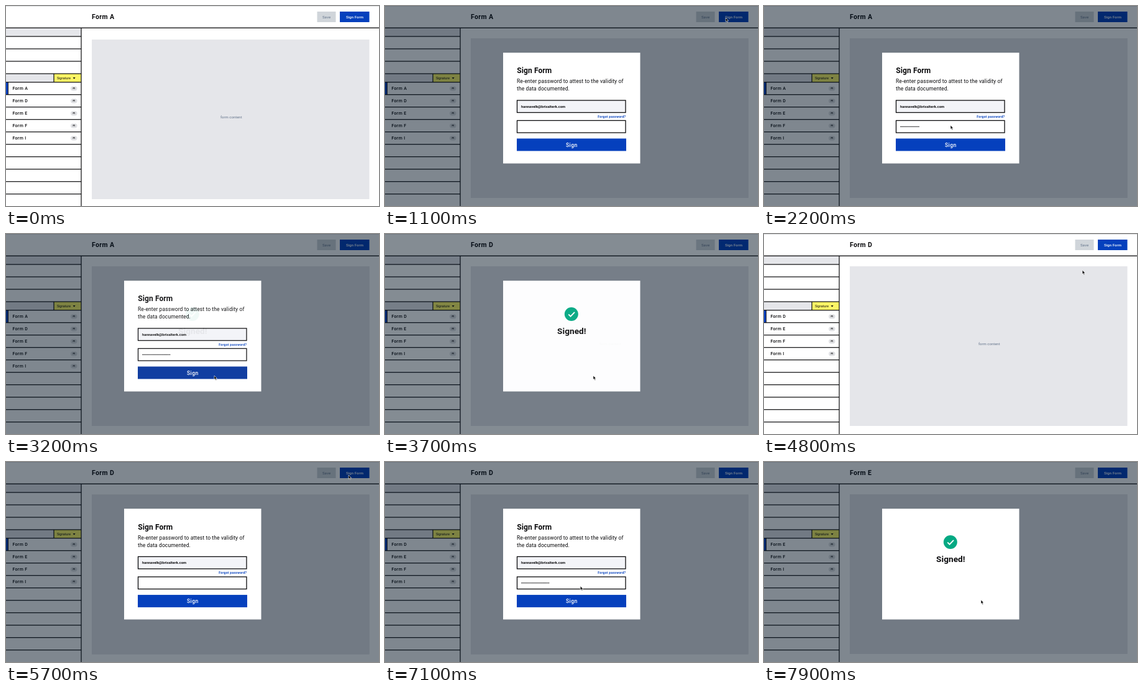
Animation of 600 by 322 pixels, one loop 8 s. Source, as an HTML page with a canvas:

```html
<!DOCTYPE html>
<html lang="en">
<head>
<meta charset="utf-8">
<title>Sign Form</title>
<style>
html, body { margin: 0; width: 100%; height: 100%; overflow: hidden; background: #fff; }
canvas { display: block; width: 600px; height: 322px; }
</style>
</head>
<body>
<canvas id="stage"></canvas>
<script>
const W = 600, H = 322, LOOP = 8000, CYCLE = 4600;
const INK = '#0b0b0d', BLUE = '#0540bd', GRAY = '#e5e6ea';
const FORMS = 'ADEFI';
const EMAIL = 'hannavelk@brisalterk.com';
const DOTS = 22;
const scale = Math.max(1, window.devicePixelRatio || 1);

function prepare(canvas) {
  canvas.width = W * scale;
  canvas.height = H * scale;
  const c = canvas.getContext('2d');
  c.scale(scale, scale);
  c.textBaseline = 'alphabetic';
  return c;
}
const view = prepare(document.getElementById('stage'));
const layer = document.createElement('canvas');
const back = prepare(layer);
let g = view;

const clamp = v => Math.max(0, Math.min(1, v));
const ease = v => v < .5 ? 4 * v ** 3 : 1 - 4 * (1 - v) ** 3;

function rect(x, y, w, h, color) {
  g.fillStyle = color;
  g.fillRect(x, y, w, h);
}

// y is the middle of the capital letters
function text(s, x, y, size, weight, color, spacing = 0, align = 'left') {
  g.font = `${weight} ${size}px Roboto, sans-serif`;
  g.letterSpacing = spacing + 'px';
  g.textAlign = align;
  g.fillStyle = color;
  g.fillText(s, x, y + size * .356);
}

function poly(points, color) {
  g.beginPath();
  points.forEach(([x, y]) => g.lineTo(x, y));
  g.closePath();
  g.fillStyle = color;
  g.fill();
}

function field(y, color) {
  g.fillStyle = color;
  g.strokeStyle = INK;
  g.lineWidth = 1.3;
  g.fillRect(212.5, y, 174.5, 19.6);
  g.strokeRect(212.5, y, 174.5, 19.6);
}

function sidebar(n) {
  rect(0, 36, 121, 13, GRAY);
  rect(0, 109, 77, 14, GRAY);
  rect(77, 109, 44, 14, '#fcf565');
  rect(76.4, 109, 1.2, 14, INK);
  text('Signature', 82, 116, 5, 400, INK, .08);
  poly([[107.6, 115], [111.6, 115], [109.6, 117.6]], INK);

  rect(0, 123, 3.3, 20, BLUE);
  rect(3.1, 123, .9, 20, INK);
  [...FORMS.slice(n)].forEach((name, i) => {
    const y = 132.8 + i * 20;
    text('Form ' + name, 10.4, y, 7, 500, INK, .35);
    g.beginPath();
    g.roundRect(104, y - 3.6, 10.6, 7.2, 3.6);
    g.fillStyle = '#e0e1e4';
    g.fill();
    text('PI', 109.3, y, 3.8, 700, INK, 0, 'center');
  });

  for (let y = 49; y <= 109; y += 20) rect(0, y - .6, 121, 1.2, INK);
  for (let y = 122.7; y < H; y += 20) rect(0, y - .6, 121, 1.2, INK);
  rect(120.4, 35, 1.2, H, INK);
}

function page(n, top) {
  rect(0, 0, W, H, '#fff');
  rect(0, 0, W, 1, '#dfe0e2');
  sidebar(n);
  rect(0, 34.6, W, 1.3, INK);
  text('Form ' + FORMS[n], 138, 17.5, 10.5, 700, INK, .35);
  rect(500.5, 9, 30, 17, '#d0d5da');
  text('Save', 515.6, 17.5, 6, 400, '#64748b', .15, 'center');
  rect(537, 9, 47.5, 17, BLUE);
  text('Sign Form', 561, 17.5, 6, 500, '#fff', .08, 'center');
  rect(138, top, 446.5, 257, GRAY);
  text('form content', 362.3, top + 125.2, 6, 400, '#64748b', 0, 'center');
}

function dialog(n, top) {
  page(n, top);
  // the caption is hidden while a dialog is open
  rect(138, top, 446.5, 257, GRAY);
  rect(0, 0, W, H, 'rgba(0,16,32,.5)');
  rect(190, 75.2, 220.5, 178.3, '#fff');
}

function signDialog(n, dots, hot) {
  const dy = n ? .5 : 0;
  dialog(n, 52 + dy);
  g.save();
  g.translate(0, dy);
  text('Sign Form', 212.3, 103.8, 12, 700, INK, .1);
  text('Re-enter password to attest to the validity of', 212, 121.3, 8.5, 400, INK, .11);
  text('the data documented.', 212, 133, 8.5, 400, INK, .11);
  field(151.9, '#f3f4f8');
  text(EMAIL, 219, 161.8, 5.8, 700, INK, .06);
  text('Forgot password?', 387.3, 178, 5, 700, BLUE, .3, 'right');
  field(184.4, '#fff');
  for (let i = 0; i < dots; i++) {
    g.beginPath();
    g.arc(220 + i * 2.07, 194.2, .8, 0, 7);
    g.fillStyle = INK;
    g.fill();
  }
  rect(212, 213.4, 176, 20, hot ? '#03339c' : BLUE);
  text('Sign', 300.3, 223.5, 8.6, 500, '#fff', .4, 'center');
  g.restore();
}

function signedDialog(n) {
  dialog(n, 52);
  g.beginPath();
  g.arc(299.8, 129, 11, 0, 7);
  g.fillStyle = '#04a983';
  g.fill();
  g.beginPath();
  g.moveTo(295.2, 129.4);
  g.lineTo(298.5, 132.6);
  g.lineTo(305, 125.8);
  g.strokeStyle = '#fff';
  g.lineWidth = 1.9;
  g.stroke();
  text('Signed!', 300.3, 156, 13.5, 700, INK, .1, 'center');
}

function dissolve(draw, p) {
  if (p <= 0) return;
  g = back;
  draw();
  g = view;
  g.globalAlpha = p;
  g.drawImage(layer, 0, 0, W, H);
  g.globalAlpha = 1;
}

// each move: start, end, from, to
const MOVES = [
  [100, 800, 430, 130, 548, 19],
  [1300, 1750, 548, 19, 300, 192],
  [2250, 2800, 300, 192, 335, 228],
  [4350, 5050, 335, 228, 551, 21],
  [5850, 6350, 551, 21, 302, 192],
  [6900, 7400, 302, 192, 349, 222]
];

function pointer(t) {
  const move = MOVES.filter(m => m[0] <= t).pop();
  if (!move) return;
  const [a, b, x0, y0, x1, y1] = move;
  const p = ease(clamp((t - a) / (b - a)));
  g.save();
  g.translate(x0 + (x1 - x0) * p, y0 + (y1 - y0) * p);
  const arrow = [[0, 0], [0, 6.3], [1.4, 5.1], [2.5, 7.4], [3.6, 6.9], [2.6, 4.7], [4.4, 4.5]];
  poly(arrow, '#000');
  g.strokeStyle = '#fff';
  g.lineWidth = .6;
  g.stroke();
  g.restore();
}

function render(t) {
  const n = t < CYCLE ? 0 : 1, u = t - n * CYCLE;
  const signedAt = n ? 3080 : 3190;
  const opened = clamp((u - 930) / 160);
  const signed = clamp((u - signedAt) / 200);
  const closed = clamp((u - 3690) / 290);
  const dots = Math.round(DOTS * clamp((u - 1800) / 600));

  g = view;
  if (opened < 1) page(n, n ? 52 : 54);
  if (signed < 1) dissolve(() => signDialog(n, dots, u > 2680), opened);
  if (closed < 1) dissolve(() => signedDialog(n + 1), signed);
  dissolve(() => page(n + 1, 52), closed);
  pointer(t);
}

const begin = performance.now();
function tick() {
  render((performance.now() - begin) % LOOP);
  requestAnimationFrame(tick);
}
tick();
</script>
</body>
</html>
```
